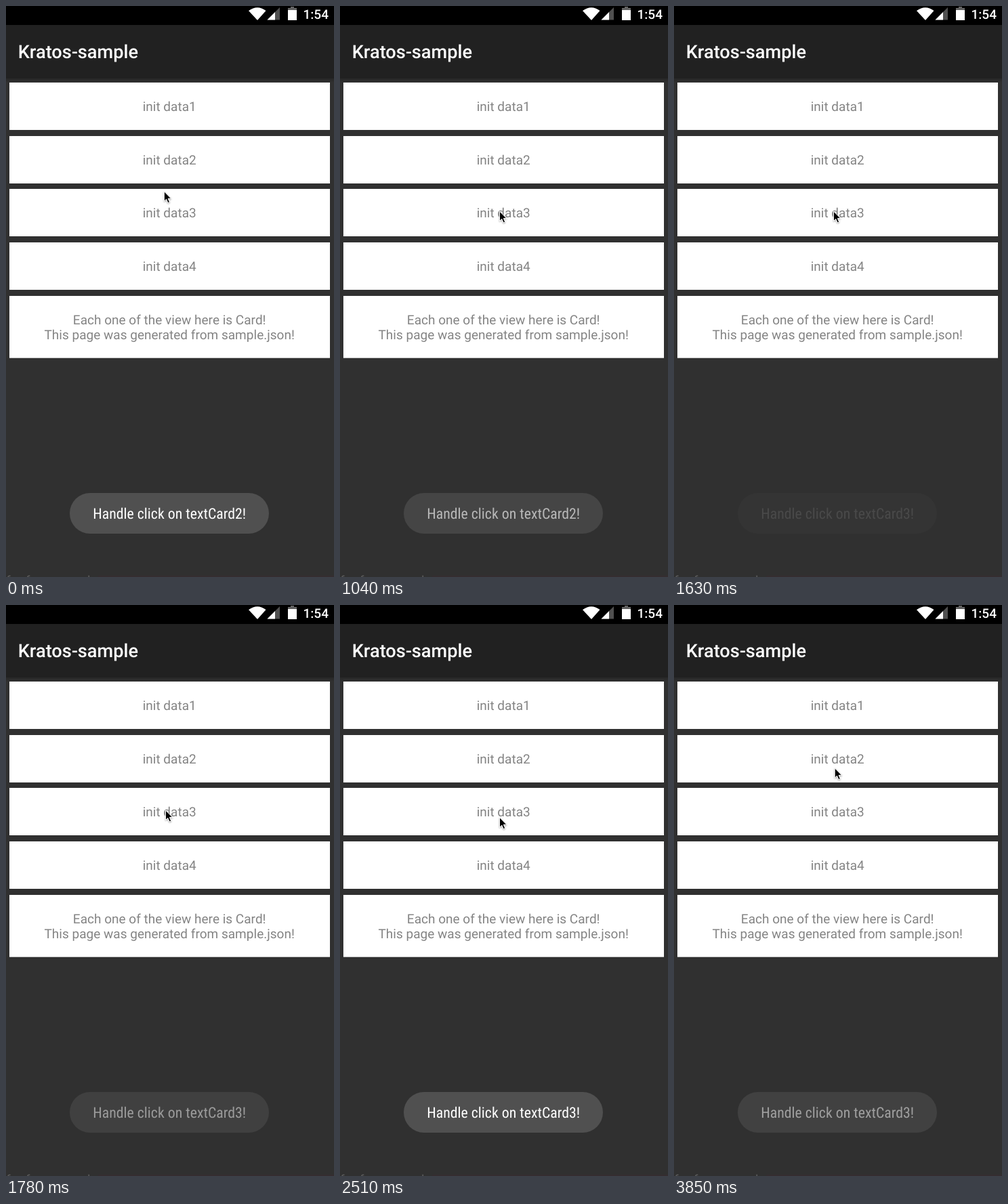
An HTML page for the animation above (3.95 s loop, 484 by 843 pixels).

```html
<!DOCTYPE html>
<html lang="en">
<head>
<meta charset="utf-8">
<title>Card list</title>
<style>
  html, body { margin: 0; width: 100%; height: 100%; overflow: hidden; background: #303030; }
  svg { display: block; width: 484px; height: 843px; font-family: Roboto, sans-serif; text-rendering: geometricPrecision; }
  .card { fill: #fff; }
  .label { fill: #848484; font-size: 19.05px; text-anchor: middle; }
  .bar { fill: #fff; font-weight: 500; }
  .note { fill: #fff; font: 21.8px "Roboto Condensed", Roboto, sans-serif; font-stretch: 75%; text-anchor: middle; }
</style>
</head>
<body>
<svg viewBox="0 0 484 843">
  <defs>
    <linearGradient id="shade" x2="0" y2="1">
      <stop stop-color="#272727"/><stop offset="1" stop-color="#303030"/>
    </linearGradient>
    <filter id="soft" x="-50%" y="-50%" width="200%" height="200%">
      <feDropShadow dx="0" dy="1" stdDeviation=".8" flood-opacity=".4"/>
    </filter>
  </defs>
  <rect width="484" height="843" fill="#303030"/>
  <rect y="107" width="484" height="6" fill="url(#shade)"/>
  <rect y="28" width="484" height="79" fill="#212121"/>
  <rect width="484" height="28"/>
  <text class="bar" x="17.7" y="76.7" font-size="27.2">Kratos-sample</text>
  <text class="bar" x="438.5" y="19" font-size="19.05">1:54</text>

  <path d="M358 7Q371 -2.5 383.5 7L371 21Z" fill="#fff"/>
  <path d="M404 2V20.5H385.5Z" fill="#505050"/>
  <path d="M397 9V20.5H385.5Z" fill="#fff"/>
  <path d="M416 3.5H420V1.5H425V3.5H429V21H416Z" fill="#fff"/>
  <path d="M416 3.5H420V1.5H425V3.5H429V6H416Z" fill="#606060"/>

  <g id="cards"></g>

  <rect x="136" y="841" width="348" height="2" fill="#352d30"/>
  <text x="0" y="854.5" font-size="19.05" fill="#5c5c5c">for frames and</text>

  <g id="toast">
    <rect x="94" y="719" width="294" height="60" rx="30" fill="#505050"/>
    <text id="note" class="note" x="241.2" y="757"></text>
  </g>
  <path id="cursor" d="M0 0V14.5L3.3 11.5L5.6 17L8.2 15.9L5.9 10.6H10.4Z"
        stroke="#fff" stroke-width="1" filter="url(#soft)"/>
</svg>
<script>
  const LOOP = 3950, TICK = 148, FADE = 500;
  const $ = id => document.getElementById(id);

  const cards = [
    ["init data1"], ["init data2"], ["init data3"], ["init data4"],
    ["Each one of the view here is Card!", "This page was generated from sample.json!"]
  ];

  function add(tag, attrs, text = "") {
    const el = document.createElementNS("http://www.w3.org/2000/svg", tag);
    for (const key in attrs) el.setAttribute(key, attrs[key]);
    el.textContent = text;
    $("cards").append(el);
  }

  cards.forEach((lines, i) => {
    const y = Math.floor(113.4 + 78.65 * i);
    add("rect", { class: "card", x: 5, y, width: 473, height: 48.3 + 21.7 * lines.length });
    lines.forEach((line, j) => add("text", { class: "label", x: 241.2, y: y + 42.4 + 22 * j }, line));
  });

  // progress from 0 to 1 between two times
  const part = (t, from, to) => Math.min(1, Math.max(0, (t - from) / (to - from)));
  const smooth = u => u * u * (3 - 2 * u);
  const fade = (t, from) => smooth(part(t, from, from + FADE));

  // settle on the third card, drift down, then sweep up to the second
  function pointer(t) {
    const settle = 1 - (1 - part(t, 0, 600)) ** 2;
    const drift = part(t, 1930, 2810);
    const sweep = smooth(part(t, 2960, 3850) ** 0.8);
    return [233.3 + 2.2 * settle + 1.7 * sweep, 273.7 + 29.3 * settle + 16 * drift - 78.3 * sweep];
  }

  function draw() {
    // the screen refreshes in even ticks
    const t = Math.floor((performance.now() % LOOP + 6) / TICK) * TICK;
    $("cursor").setAttribute("transform", `translate(${pointer(t)})`);
    $("toast").setAttribute("opacity", 1 - fade(t, 840) + fade(t, 1520) - fade(t, 3610));
    $("note").textContent = `Handle click on textCard${t < 1500 ? 2 : 3}!`;
    requestAnimationFrame(draw);
  }
  draw();
</script>
</body>
</html>
```
